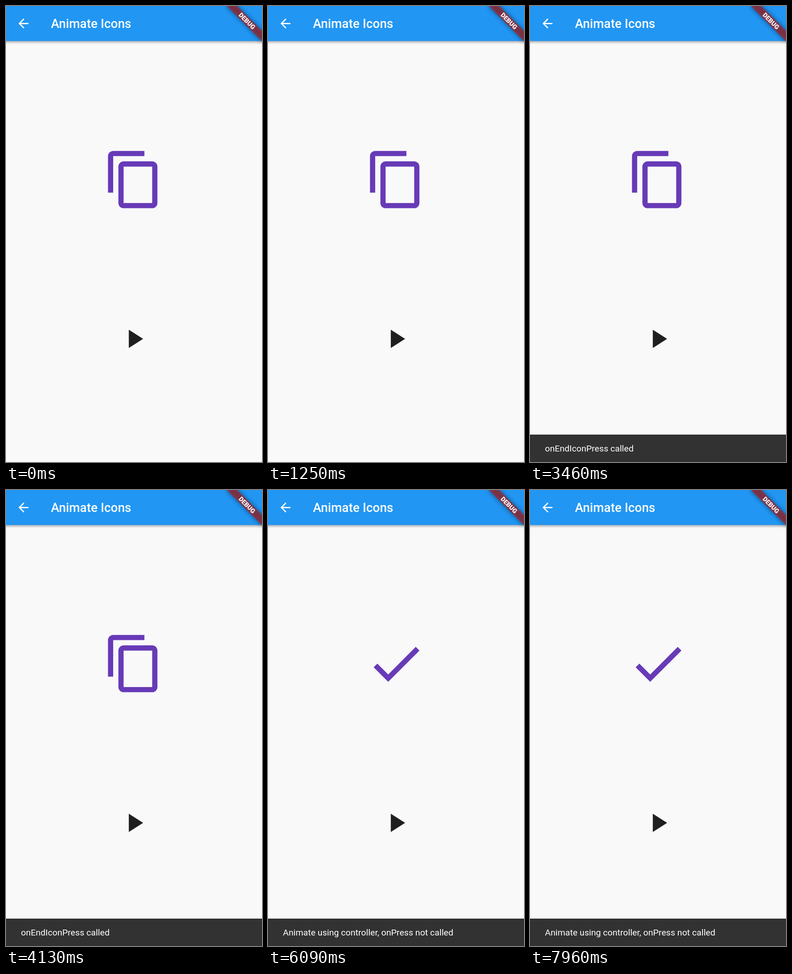
An HTML page for the animation above (8 s loop, 561 by 998 pixels).

```html
<!DOCTYPE html>
<html lang="en">
<head>
<meta charset="utf-8">
<title>Animate Icons</title>
<style>
  html, body { margin: 0; width: 100%; height: 100%; overflow: hidden; background: #f9f9fa; }
  svg { display: block; width: 100%; height: 100%; }
  text { font-family: Roboto, sans-serif; fill: #fff; }
</style>
</head>
<body>
<svg viewBox="0 0 561 998">
  <defs>
    <filter id="barShadow" x="-5%" y="-50%" width="110%" height="200%"><feGaussianBlur stdDeviation="2.7"/></filter>
    <filter id="bannerShadow" x="-30%" y="-150%" width="160%" height="400%"><feGaussianBlur stdDeviation="5.4"/></filter>
  </defs>

  <rect width="561" height="998" fill="#f9f9fa"/>

  <!-- App bar -->
  <rect x="-10" width="581" height="79.5" opacity=".32" filter="url(#barShadow)"/>
  <rect width="561" height="76.6" fill="#2196f3"/>
  <path transform="translate(21.9 21.9) scale(1.368)" fill="#fff"
    d="M20 11H7.83l5.59-5.59L12 4l-8 8 8 8 1.41-1.41L7.83 13H20z"/>
  <text x="98.5" y="48.2" font-size="27.36" font-weight="500">Animate Icons</text>

  <!-- Icons on a 24-unit grid -->
  <g fill="#673ab7">
    <path id="copy" d="M16 1H4c-1.1 0-2 .9-2 2v14h2V3h12zM19 5H8c-1.1 0-2 .9-2 2v14c0 1.1.9 2 2 2h11c1.1 0 2-.9 2-2V7c0-1.1-.9-2-2-2zm0 16H8V7h11z"/>
    <path id="check" d="M9 16.17L4.83 12l-1.42 1.41L9 19 21 7l-1.41-1.41z"/>
  </g>
  <path transform="translate(246.3 694.3) scale(2.85)" fill="#1f1f1f" d="M8 5v14l11-7z"/>

  <!-- Snack bar -->
  <g id="snack">
    <rect width="561" height="62" fill="#323232"/>
    <text id="message" x="32.8" y="36.8" font-size="19.15"></text>
  </g>

  <!-- Corner banner -->
  <g transform="translate(561 0) rotate(45)">
    <rect x="-54.7" y="38.3" width="109.4" height="16.4" opacity=".5" filter="url(#bannerShadow)"/>
    <rect x="-54.7" y="38.3" width="109.4" height="16.4" fill="#b71c1c" fill-opacity=".627"/>
    <text y="51.4" font-size="13.95" font-weight="900" text-anchor="middle">DEBUG</text>
  </g>
</svg>
<script>
const LOOP = 8000, SPIN = 350, SLIDE = 250, SNACK_HEIGHT = 60;
const spins = [
  { start: 1270, to: 1 },
  { start: 2361, to: 0 },
  { start: 5590, to: 1 },
];
const snacks = [
  { text: 'onStartIconPress called', enter: 1325, leave: 2640 },
  { text: 'onEndIconPress called', enter: 2910, leave: 4190 },
  { text: 'Animate using controller, onPress not called', enter: 5565, leave: Infinity },
];

const [copy, check, snack, message] =
  ['copy', 'check', 'snack', 'message'].map(id => document.getElementById(id));
const clamp = v => Math.min(1, Math.max(0, v));

// cubic-bezier(.4, 0, .2, 1), solved by bisection
function fastOutSlowIn(x) {
  if (x <= 0 || x >= 1) return clamp(x);
  let low = 0, high = 1, u = .5;
  for (let i = 0; i < 20; i++) {
    u = (low + high) / 2;
    const at = 1.2 * u * (1 - u) ** 2 + .6 * u * u * (1 - u) + u ** 3;
    if (at < x) low = u; else high = u;
  }
  return 3 * u * u * (1 - u) + u ** 3;
}

function place(icon, angle, opacity) {
  icon.setAttribute('transform',
    `translate(280.5 379.9) rotate(${angle}) scale(5.7) translate(-12 -12)`);
  icon.setAttribute('opacity', opacity);
}

function drawIcons(t) {
  let x = 0;
  for (const { start, to } of spins) {
    if (t < start) break;
    const p = clamp((t - start) / SPIN);
    x = to ? p : 1 - p;
  }
  place(copy, 180 * x, 1 - x);
  place(check, -180 * (1 - x), x);
}

function drawSnack(t) {
  const current = snacks.find(s => t >= s.enter && t < s.leave + SLIDE);
  snack.style.display = current ? '' : 'none';
  if (!current) return;
  const { text, enter, leave } = current;
  const leaving = t > leave;
  const p = leaving ? 1 - (t - leave) / SLIDE : clamp((t - enter) / SLIDE);
  const shown = SNACK_HEIGHT * fastOutSlowIn(p);
  snack.setAttribute('transform', `translate(0 ${998 - shown})`);
  if (message.textContent !== text) message.textContent = text;
  message.setAttribute('opacity', leaving ? clamp((p - .72) / .28) : clamp((p - .4) / .6));
}

function frame() {
  const t = performance.now() % LOOP;
  drawIcons(t);
  drawSnack(t);
  requestAnimationFrame(frame);
}
frame();
</script>
</body>
</html>
```
